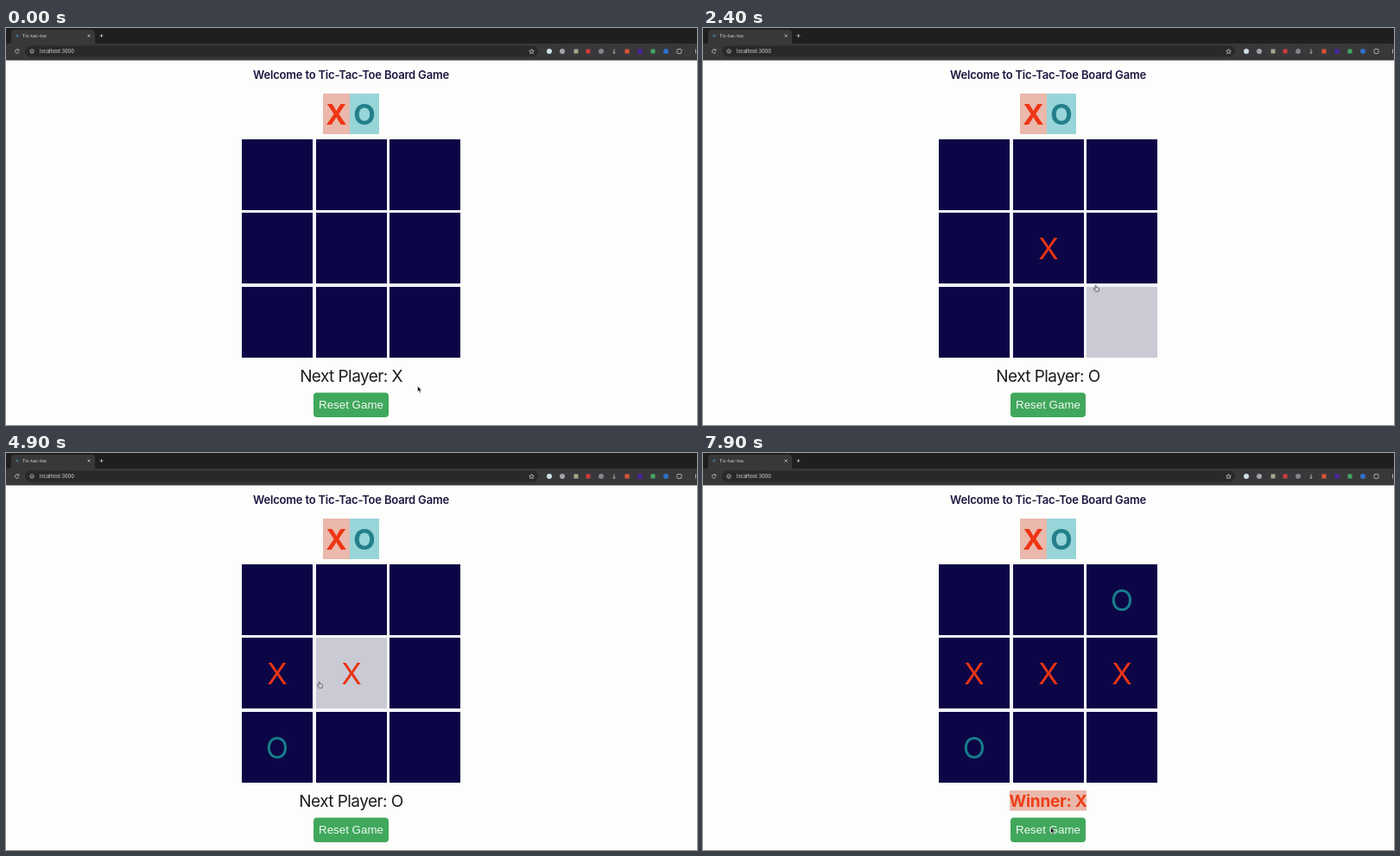
Write an HTML page that moves like this. It is 800 px wide and 460 px high and loops after 8 s.

```html
<!DOCTYPE html>
<html lang="en">
<head>
<meta charset="utf-8">
<title>Tic-tac-toe</title>
<style>
  html, body { margin: 0; width: 100%; height: 100%; overflow: hidden; background: #fdfdfc; }
  svg { display: block; width: 800px; height: 460px; font-family: Inter, "Open Sans", sans-serif; }
  text { text-anchor: middle; }
  .tiny { text-anchor: start; font-weight: 500; fill: #c6c6c8; }
  .title { font-size: 13px; font-weight: 600; letter-spacing: -.015em; fill: #1b1740; }
  .badge { font-size: 33px; font-weight: 700; }
  .mark { font-size: 34.5px; }
  .status { font-size: 19px; letter-spacing: -.03em; fill: #1c1c20; }
  .winner { font-weight: 700; letter-spacing: -.015em; fill: #ee3f18; }
  .reset { font: 13.333px "Liberation Sans", Arial, sans-serif; fill: #f2f8f4; }
</style>
</head>
<body>
<svg id="stage" viewBox="0 0 800 460">
  <rect width="800" height="460" fill="#fdfdfc"/>
  <rect width="800" height="18" fill="#1f1f20"/>
  <rect y="18" width="800" height="19.5" fill="#38383b"/>
  <path d="M4 18q2 0 2-3V6q0-4 4-4H99q4 0 4 4v9q0 3 2 3z" fill="#38383b"/>
  <rect x="22" y="20.5" width="594" height="13" rx="6.5" fill="#29292b"/>
  <circle cx="13" cy="9" r="1.8" fill="#3c6a78"/>
  <text class="tiny" x="19" y="11" font-size="5.2">Tic-tac-toe</text>
  <text class="tiny" x="39" y="29" font-size="5.5">localhost:3000</text>
  <g fill="none" stroke="#c6c6c8" stroke-width=".8">
    <path d="M94.5 7.5l3 3m0-3l-3 3M108.5 9h4m-2-2v4"/>
    <path d="M14.6 25.8a2.2 2.2 0 1 0 .2 2M14.8 24.5v1.6h-1.6"/>
    <circle cx="30" cy="27" r="2.2"/>
    <path d="M30 26.5v1.5"/>
    <path d="M608.5 24.4l.8 1.9 2 .1-1.5 1.3.5 2-1.8-1.1-1.8 1.1.5-2-1.5-1.3 2-.1z"/>
    <path d="M704 24.5v5m-1.5-1.5l1.5 1.5 1.5-1.5"/>
    <rect x="777" y="24.5" width="5" height="5" rx="1"/>
    <path d="M798.5 24.5v5"/>
  </g>
  <g id="icons"></g>

  <text class="title" x="399.5" y="59">Welcome to Tic-Tac-Toe Board Game</text>
  <rect x="367" y="76" width="31" height="47" fill="#eab8ac"/>
  <rect x="398" y="76" width="34" height="47" fill="#98d5d8"/>
  <text class="badge" x="382.5" y="112" fill="#ee3514">X</text>
  <text class="badge" x="415" y="112" fill="#23808a">O</text>
  <g id="board"></g>
  <rect id="glow" x="355" y="391" width="89" height="23.5" fill="#eab8ac"/>
  <text id="status" class="status" x="399.5" y="410"></text>
  <rect x="356" y="422.5" width="87" height="28.5" rx="4" fill="#40a85c"/>
  <text class="reset" x="399.5" y="441.3">Reset Game</text>
  <path id="arrow" d="M-1.5 -4v6.5l1.5-1.4 1.2 2.6 1.2-.6-1.2-2.4h2.1z" fill="#111" stroke="#eee" stroke-width=".5"/>
  <path id="hand" d="M-1 -3.5q.9-.6 1.300.4l.4 1.700 2 .5q1 .3.8 1.400l-.5 2.700h-3.600l-2-2.600q-.2-1 .9-.6l.8.5z" fill="#dcdce2" stroke="#44444c" stroke-width=".8"/>
</svg>
<script>
const LOOP = 8000, STEP = 100;
const LEFT = 273.4, TOP = 128.8, SIZE = 82, PITCH = 85.4;
const DARK = '#0d0646', HOVER = '#cacad5';
const INK = { X: '#e93514', O: '#167c8a' };

// time, x, y
const path = [
  [0, 478, 419], [500, 472, 412], [1000, 438, 362], [1400, 417, 315],
  [1700, 407, 268], [2000, 408, 262], [2400, 455, 302], [2800, 400, 330],
  [3100, 334, 342], [3500, 330, 338], [4100, 329, 221], [4300, 327, 242],
  [4600, 330, 258], [4900, 363, 269], [5400, 420, 262], [6000, 459, 199],
  [6300, 474, 180], [6500, 476, 184], [6900, 478, 250], [7200, 474, 258],
  [7600, 425, 410], [7900, 404, 438]
];

// time, cell, player
const moves = [[1900, 4, 'X'], [3300, 6, 'O'], [4400, 3, 'X'], [6400, 2, 'O'], [7100, 5, 'X']];

const $ = id => document.getElementById(id);
function add(parent, tag, attrs) {
  const el = document.createElementNS('http://www.w3.org/2000/svg', tag);
  for (const k in attrs) el.setAttribute(k, attrs[k]);
  return parent.appendChild(el);
}

// x, colour, round
const icons = [
  [629, '#cfe0e8', 1], [644, '#a4a4a8', 1], [660, '#a9a58c', 0], [674, '#d23c38', 0],
  [689, '#85858a', 1], [719, '#dc5534', 0], [734, '#4c22a8', 0], [749, '#44a860', 0], [764, '#2f70c8', 1]
];
for (const [x, fill, round] of icons) {
  if (round) add($('icons'), 'circle', { cx: x, cy: 27, r: 3, fill });
  else add($('icons'), 'rect', { x: x - 2.5, y: 24.5, width: 5, height: 5, fill });
}

add($('board'), 'rect', { x: 273, y: 129, width: 253, height: 253, fill: '#f5f5fa' });
const cells = Array.from({ length: 9 }, (_, i) => {
  const x = Math.round(LEFT + i % 3 * PITCH);
  const y = Math.round(TOP + Math.floor(i / 3) * PITCH);
  const box = add($('board'), 'rect', { x, y, width: SIZE, height: SIZE });
  const mark = add($('board'), 'text', { class: 'mark', x: x + SIZE / 2, y: y + 53.5 });
  return { x, y, box, mark };
});

function cursorAt(t) {
  const i = path.findIndex(p => p[0] > t);
  if (i < 0) return path[path.length - 1].slice(1);
  const [t0, x0, y0] = path[i - 1], [t1, x1, y1] = path[i];
  const k = (t - t0) / (t1 - t0);
  return [x0 + (x1 - x0) * k, y0 + (y1 - y0) * k];
}

function draw(t) {
  const [x, y] = cursorAt(t);
  const done = moves.filter(m => m[0] <= t);
  let over = false;
  cells.forEach((c, i) => {
    const inside = x >= c.x && x <= c.x + SIZE && y - 1 >= c.y && y - 1 <= c.y + SIZE;
    const move = done.find(m => m[1] === i);
    over = over || inside;
    c.box.setAttribute('fill', inside ? HOVER : DARK);
    c.mark.textContent = move ? move[2] : '';
    if (move) c.mark.setAttribute('fill', INK[move[2]]);
  });
  const won = done.length === moves.length;
  $('status').textContent = won ? 'Winner: X' : 'Next Player: ' + 'XO'[done.length % 2];
  $('status').classList.toggle('winner', won);
  $('glow').style.display = won ? '' : 'none';
  for (const id of ['arrow', 'hand']) {
    $(id).setAttribute('transform', `translate(${x} ${y})`);
    $(id).style.display = (id === 'hand') === over ? '' : 'none';
  }
}

const start = performance.now();
function tick() {
  const t = (performance.now() - start) % LOOP;
  draw(Math.floor(t / STEP) * STEP);
  requestAnimationFrame(tick);
}
tick();
</script>
</body>
</html>
```
